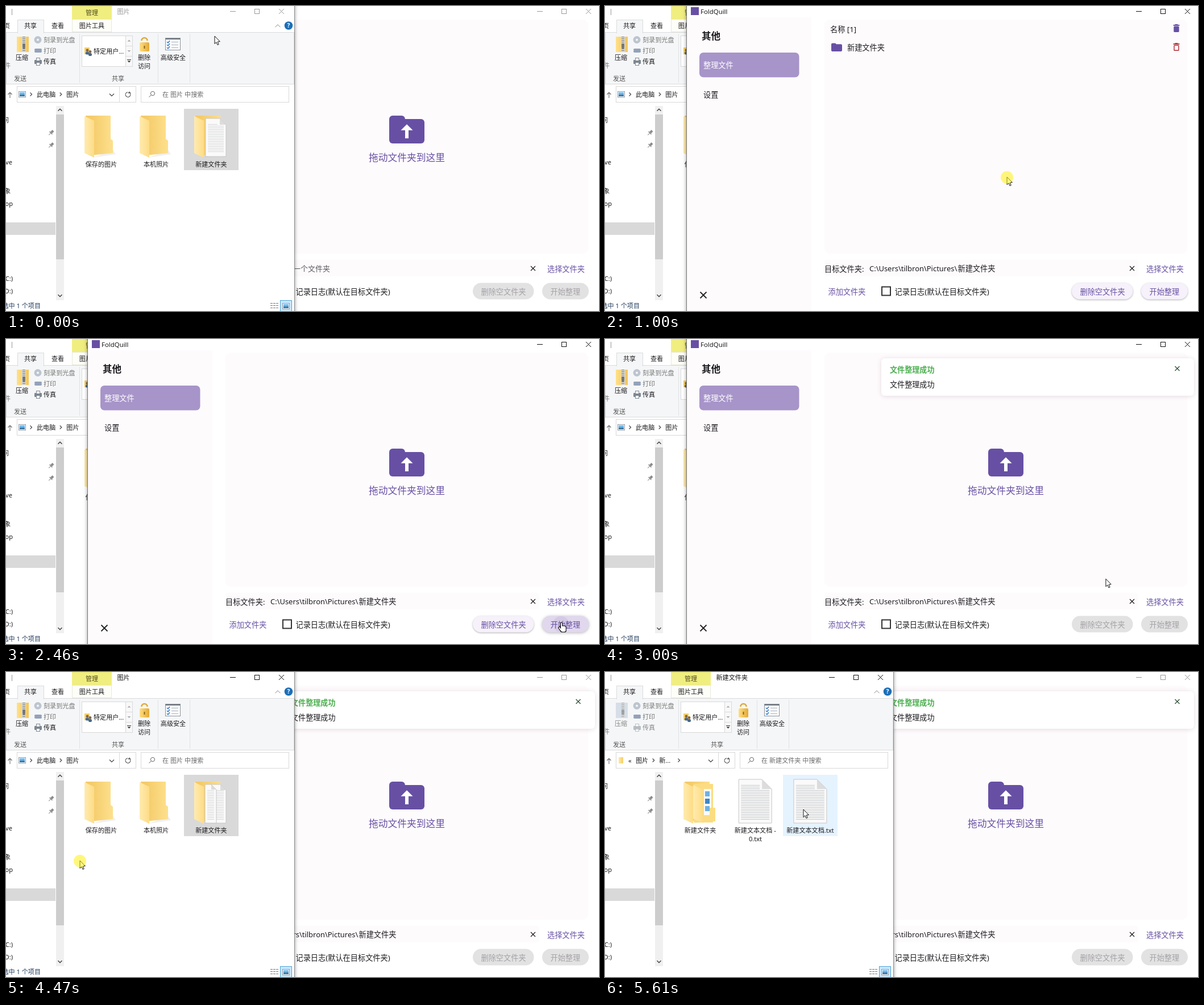
Write an HTML page with a canvas that moves like this. It is 1043 px wide and 537 px high and loops after 6.01 s.

```html
<!DOCTYPE html>
<html lang="zh">
<head>
<meta charset="utf-8">
<style>
html, body { margin: 0; width: 100%; height: 100%; overflow: hidden; background: #fff; }
canvas { display: block; }
</style>
</head>
<body>
<canvas id="stage" width="1043" height="537"></canvas>
<script>
const g = document.getElementById('stage').getContext('2d');
const LOOP = 6010, TICK = 66.7;
const PURPLE = '#6750a4', INK = '#1c1b1f', TINT = '#fefbfd', GREY = '#777', EDGE = '#d9d9d9';
const FONT = '"Noto Sans", "Noto Sans CJK SC", "Noto Sans CJK", sans-serif';
const { PI } = Math;

// Where the pointer goes, and between which ticks it travels there
const START = { x: 367, y: 53 };
const MOVES = [
  { from: 0, to: 4, x: 358, y: 238 },      // folder
  { from: 5, to: 10, x: 688, y: 230 },     // drop zone
  { from: 10, to: 13, x: 707, y: 301 },
  { from: 18, to: 24, x: 956, y: 475 },    // start button
  { from: 24, to: 31, x: 977, y: 499 },
  { from: 37, to: 42, x: 886, y: 426 },
  { from: 44, to: 51, x: 794, y: 360 },
  { from: 52.7, to: 64, x: 130, y: 332 },  // back to the browser
  { from: 67, to: 75, x: 349, y: 242 }     // folder again
];

const clamp = v => Math.min(1, Math.max(0, v));
const smooth = f => f * f * (3 - 2 * f);
const within = (k, a, b) => k >= a && k < b;

function pointer(k) {
  return MOVES.reduce((p, m) => {
    const f = smooth(clamp((k - m.from) / (m.to - m.from)));
    return { x: p.x + (m.x - p.x) * f, y: p.y + (m.y - p.y) * f };
  }, START);
}

/* Drawing helpers */
function rect(x, y, w, h, fill, stroke) {
  if (fill) { g.fillStyle = fill; g.fillRect(x, y, w, h); }
  if (stroke) { g.strokeStyle = stroke; g.lineWidth = 1; g.strokeRect(x + .5, y + .5, w - 1, h - 1); }
}
function round(x, y, w, h, r, fill) {
  g.beginPath(); g.roundRect(x, y, w, h, r); g.fillStyle = fill; g.fill();
}
function disc(x, y, r, fill) {
  g.beginPath(); g.arc(x, y, r, 0, 2 * PI); g.fillStyle = fill; g.fill();
}
function ring(x, y, r, color, w = 1, a = 0, b = 2 * PI) {
  g.beginPath(); g.arc(x, y, r, a, b); g.strokeStyle = color; g.lineWidth = w; g.stroke();
}
function trace(pts) {
  g.beginPath();
  for (let i = 0; i < pts.length; i += 2) g.lineTo(pts[i], pts[i + 1]);
}
function poly(fill, ...pts) { trace(pts); g.fillStyle = fill; g.fill(); }
function line(color, w, ...pts) { trace(pts); g.strokeStyle = color; g.lineWidth = w; g.stroke(); }
const hline = (x, y, w, color, t = 1) => rect(x, y, w, t, color);
const vline = (x, y, h, color, t = 1) => rect(x, y, t, h, color);

function at(x, y, draw, turn = 0) {
  g.save(); g.translate(x, y); g.rotate(turn); draw(); g.restore();
}
function faded(a, draw) { g.save(); g.globalAlpha *= a; draw(); g.restore(); }
function shadowed(blur, color, draw) {
  g.save();
  g.shadowBlur = blur; g.shadowColor = color; g.shadowOffsetY = 1;
  draw();
  g.restore();
}
function ramp(x0, x1, a, b) {
  const r = g.createLinearGradient(x0, 0, x1, 0);
  r.addColorStop(0, a); r.addColorStop(1, b);
  return r;
}

const RIGHT = 0, DOWN = PI / 2, UP = -PI / 2;
const chevron = (x, y, r, turn, color = '#444', w = 1.2) =>
  at(x, y, () => line(color, w, -r / 2, -r, r / 2, 0, -r / 2, r), turn);
const triangle = (x, y, r, turn, color) =>
  at(x, y, () => poly(color, -r / 2, -r, r / 2, 0, -r / 2, r), turn);
function cross(x, y, r, color, w = 1.2) {
  for (const s of [-1, 1]) line(color, w, x - r, y - r * s, x + r, y + r * s);
}

function text(s, x, cy, color = INK, size = 11.1, align = 'left', weight = 400) {
  g.font = `${weight} ${size}px ${FONT}`;
  g.textAlign = align;
  g.fillStyle = color;
  g.fillText(s, x, cy + size * .37);
  return g.measureText(s).width;
}
const centred = (s, x, cy, color) => text(s, x, cy, color, 11.1, 'center');
const ending = (s, x, cy, color) => text(s, x, cy, color, 11.1, 'right');
const label = (s, x, cy, color = INK) => text(s, x, cy, color, 13.2, 'left', 350);

function windowFrame(x, w) {
  shadowed(7, 'rgba(0,0,0,.5)', () => rect(x, -20, w, 580, '#fff'));
}
function windowButtons(x, active) {
  const color = active ? '#111' : '#999';
  hline(x - 5, 9, 10, color);
  rect(x + 38, 5, 9, 9, null, color);
  cross(x + 85.5, 9.5, 4.5, color, 1);
}

/* File icons */
function page(x, y, w, h, fold, ink = '#c3c5c7') {
  at(x, y, () => {
    const outline = [0, 0, w - fold, 0, w, fold, w, h, 0, h, 0, 0];
    poly('#fafafa', ...outline);
    for (let i = 10; i < h - 6; i += 3) hline(4, i, (i < fold ? w - fold : w) - 8, ink);
    line('#c6c6c6', 1, ...outline);
    poly('#dcdcdc', w - fold, 0, w, fold, w - fold, fold);
  });
}
function flap(x, y, h) {
  at(x, y, () => poly(ramp(0, 17, '#ffebb0', '#fddc86'), 0, 0, 17, 8, 17, h, 0, h - 8));
}
function folder(x, y, content) {
  at(x, y, () => {
    poly('rgba(0,0,0,.06)', 16, 74, 55, 68, 50, 60);
    poly(ramp(12, 48, '#f4cb6a', '#fddf8b'), 2, 0, 46, 0, 46, 41, 50, 44, 50, 66, 10, 70);
    if (content) content();
    flap(0, 1, 73);
  });
}
const onePage = () => page(20, 5, 36, 67, 11, '#d6d7d8');
const twoPages = () => {
  page(28, 5, 28, 68, 10, '#d6d7d8');
  page(19, 5, 20, 68, 9, '#d6d7d8');
};
const subfolder = () => {
  rect(18, 4, 34, 68, '#fbdc82');
  rect(36, 13, 13, 46, '#fafafa');
  for (let i = 0; i < 3; i++) rect(38, 17 + 13 * i, 8, 9, i % 2 ? '#3d87c4' : '#6fb1e0');
  rect(46, 46, 10, 24, '#fbdc82');
  flap(17, 6, 67);
};
function picture(x, y) {
  rect(x, y, 13, 11, '#fff', '#8d9aa6');
  rect(x + 2, y + 2, 9, 4, '#6db9ee');
  rect(x + 2, y + 6, 9, 3, '#3f759f');
}

/* File browser window */
function tabs() {
  rect(0, 46, 507, 92, '#f5f6f7', '#dadbdc');
  rect(20, 24, 47, 24, '#f5f6f7', '#dadbdc');
  rect(21, 45, 45, 4, '#f5f6f7');
  rect(116, 0, 70, 23, '#f1ee80');
  rect(116, 23, 70, 23, '#fefef8', '#e8e8dc');
  vline(10, 5, 11, '#999');
  centred('管理', 151, 12, '#4c4a1c');
  ending('页', 7, 35);
  centred('共享', 43, 35);
  centred('查看', 91, 35);
  centred('图片工具', 151, 35);
  chevron(478, 35, 4.5, UP, '#888', 1);
  disc(497, 34.5, 7.3, '#1b6fb8');
  text('?', 497, 34.5, '#fff', 10.5, 'center', 700);
}
function sendGroup(idle) {
  const ink = idle ? '#888' : INK;
  faded(idle ? .5 : 1, () => {
    rect(19, 54, 21, 27, idle ? '#b6c8dc' : ramp(19, 40, '#ffe08a', '#f2c558'));
    rect(28, 54, 7, 27, '#d9d9d4');
    for (let y = 54; y < 80; y += 3) hline(29, y, 5, '#777');
    round(29, 66, 5, 9, 2, '#777');
    round(50, 95, 13, 7, 1, '#7e8790');
    for (const y of [91, 99]) rect(53, y, 7, 6, '#fff', '#7e8790');
  });
  disc(56, 59.5, 6.5, '#bcc5cf');
  disc(56, 59.5, 2, '#f5f6f7');
  for (const y of [77, 80]) round(50, y - 2, 13, 4, 2, '#93a2ba');
  centred('压缩', 28, 91, ink);
  ending('件', 8, 105, GREY);
  ['刻录到光盘', '打印', '传真'].forEach((s, i) => text(s, 66, 60 + 19 * i, i < 2 ? GREY : ink));
  centred('发送', 25, 128, '#555');
}
function shareGroup() {
  rect(133, 52, 90, 55, '#fff', '#d8d9da');
  for (let i = 0; i < 3; i++) {
    rect(210, 52 + 18 * i, 13, 19, '#f8f8f9', '#d8d9da');
    triangle(216.5, 61 + 18.5 * i, 3, i ? DOWN : UP, i < 2 ? '#aaa' : '#333');
  }
  hline(213, 94, 7, '#333');
  rect(138, 73, 9, 12, '#f5cf68');
  for (const x of [143, 148]) {
    disc(x, x / 2 + 6.5, 2.4, '#80654c');
    round(x - 3, x / 2 + 9, 6, 5, 2, '#466888');
  }
  text('特定用户...', 154, 80);
  ring(243.5, 61, 5, '#e0a93a', 2.6, PI, 0);
  round(235, 64, 17, 16, 2, ramp(235, 252, '#ffdf83', '#e4a934'));
  rect(242.5, 70, 2, 5, '#8d671c');
  ['删除', '访问'].forEach((s, i) => centred(s, 243, 91 + 15 * i));
  centred('共享', 197, 128, '#555');
  rect(280, 56, 27, 22, '#fff', '#8b929a');
  hline(281, 57, 25, '#6f7780', 2);
  for (let y = 63; y < 78; y += 5) {
    line('#2f74c4', 1.4, 283, y, 285, y + 2, 288, y - 2);
    hline(291, y, 12, '#a3abb5');
  }
  centred('高级安全', 294, 91);
  for (const x of [129, 267, 323]) vline(x, 49, 86, '#e1e2e3');
}
function addressBar(s) {
  vline(6.5, 153, 9, '#666');
  chevron(7, 154, 3.5, UP, '#666');
  rect(19, 141, 210, 29, '#fff', EDGE);
  vline(199, 141, 29, EDGE);
  if (s.inside) rect(24, 150, 8, 11, ramp(24, 32, '#ffe9a6', '#f5cf68'));
  else picture(22, 150);
  if (s.inside) text('«', 41, 156); else chevron(44, 155.5, 3, RIGHT);
  let x = 54;
  s.crumbs.forEach((name, i) => {
    x += text(name, x, 156) + 9;
    if (s.inside || s.short || i == 0) chevron(x, 155.5, 3, RIGHT);
    x += 10;
  });
  chevron(186, 156.5, 4, DOWN);
  ring(214.5, 156, 4.3, '#555', 1.2, -.6, 4.6);
  triangle(217, 152, 3, UP, '#555');
  rect(237, 141, 261, 29, '#fff', EDGE);
  ring(258, 154, 3.6, '#666');
  line('#666', 1, 255.3, 156.7, 251.5, 160.5);
  text(`在 ${s.inside ? '新建文件夹' : '图片'} 中搜索`, 275, 156, '#6a6a6a');
}
function sidePane() {
  rect(0, 381, 87, 22, EDGE);
  ending('问', 5, 201);
  ending('ve', 11, 275);
  ['象', 'top', , , , , , '(C:)', '(D:)'].forEach((s, i) => ending(s, s.length > 1 ? 12 : 8, 326 + 22 * i));
  for (const y of [223, 245]) at(79.5, y, () => {
    rect(-2, -5, 4, 5, '#8b8b8b'); hline(-3.5, 0, 7, '#8b8b8b', 1.5); vline(-.5, 1, 5, '#8b8b8b');
  }, PI / 4);
  rect(88, 176, 14, 342, '#f0f0f0');
  rect(88, 191, 14, 255, '#cdcdcd');
  chevron(95, 183, 3.5, UP, '#444', 1.5);
  chevron(95, 510, 3.5, DOWN, '#444', 1.5);
}
function files(s) {
  if (s.tile) rect(313, 181, 96, 108, s.tile);
  const names = s.inside ? ['新建文件夹', '新建文本文档 -', '新建文本文档.txt'] : ['保存的图片', '本机照片', '新建文件夹'];
  names.forEach((name, i) => {
    const x = 138 + 96.7 * i;
    if (s.inside && i) page(x + .5, 189, 58, 77, 17);
    else folder(Math.round(x), 193, s.inside ? subfolder : i == 2 && s.content);
    centred(name, x + 29.5, 279);
  });
  if (s.inside) centred('0.txt', 264.5, 294);
}
function statusBar(selected) {
  if (selected) ending('选中 1 个项目', 61, 528, '#1e395b');
  for (let y = 523; y < 533; y += 4)
    for (let x = 465; x < 479; x += 5) hline(x, y, 4, GREY);
  rect(482, 518, 21, 20, '#cce8ff', '#4ba3d8');
  picture(486, 523);
}
function browser(s) {
  windowFrame(-20, 527);
  vline(507, 0, 537, '#8c8c8c');
  text(s.inside ? '新建文件夹' : '图片', 195.5, 10, s.active ? '#111' : '#999');
  windowButtons(399, s.active);
  tabs();
  sendGroup(s.idle);
  shareGroup();
  addressBar(s);
  sidePane();
  if (!s.loading) files(s);
  statusBar(s.selected);
}

/* Organiser app window */
function pill(x, w, title, on, fill = '#f6f1fa', lift = 3) {
  const draw = () => round(x, 487.5, w, 29, 14.5, on ? fill : '#e3e2e3');
  on ? shadowed(lift, 'rgba(0,0,0,.3)', draw) : draw();
  label(title, x + 14.5, 503, on ? PURPLE : '#a3a1a4');
}
function bin(x, y, color, solid) {
  hline(x - 5.5, y - 6, 11, color, 1.8);
  hline(x - 2.5, y - 7, 5, color, 1.5);
  round(x - 4.7, y - 3.5, 9.4, 10.5, 1.5, color);
  if (!solid) rect(x - 3.2, y - 2, 6.4, 7.4, TINT);
}
function folderMark(x, y, w, h, r) {
  round(x, y, w * .45, h / 2, r, PURPLE);
  round(x, y + h * .12, w, h * .88, r, PURPLE);
}
function dropZone() {
  folderMark(674, 193, 62, 49, 6);
  triangle(705, 213.5, 10.5, UP, '#fff');
  rect(702, 216, 6, 17, '#fff');
  text('拖动文件夹到这里', 638, 267, PURPLE, 16.75, 'left', 350);
}
function fileList() {
  label('名称 [1]', 396, 41);
  bin(1005, 39, PURPLE, true);
  folderMark(398, 65.5, 19, 14.5, 2);
  label('新建文件夹', 426, 73);
  bin(1005, 72, '#b3363c');
}
function toast(p) {
  faded(p, () => at(0, (p - 1) * 24, () => {
    shadowed(8, 'rgba(90,40,60,.16)', () => round(486, 34, 550, 66, 6, '#fff'));
    text('文件整理成功', 501, 54, '#4caf50', 13.1, 'left', 700);
    text('文件整理成功', 501, 80, INK, 13.1, 'left', 350);
    cross(1006.5, 52, 4, '#2d5038', 1.3);
  }));
}
function sideMenu() {
  rect(144, 20, 219, 517, TINT);
  text('其他', 170, 53, INK, 16.6, 'left', 700);
  round(166, 82, 175.5, 43.5, 7, '#a794c9');
  label('整理文件', 173, 104, '#fff');
  label('设置', 173, 156);
  cross(173, 509, 5.5, '#222', 1.8);
}
function targetRow(s) {
  round(386, 447, 552, 29, 5, TINT);
  label('目标文件夹:', 386, 463);
  if (s.chosen) {
    text('C:\\Users\\tilbron\\Pictures\\', 465, 462, INK, 12.95, 'left', 350);
    label('新建文件夹', 620.5, 462);
  } else text('请选择一个文件夹', 570, 462, '#5c5a60', 13, 'right', 350);
  cross(927, 462, 4, '#222', 1.3);
  if (s.overPick) round(946, 447, 78, 29, 14.5, '#f5f0f9');
  label('选择文件夹', 952, 463, PURPLE);
}
function actionRow(s) {
  label('添加文件夹', 392.5, 503, PURPLE);
  rect(486, 493.5, 17, 17, '#333');
  rect(488, 495.5, 13, 13, '#fff');
  label('记录日志(默认在目标文件夹)', 509.5, 503);
  pill(821, 107.5, '删除空文件夹', s.enabled);
  const fill = s.pressed ? '#e1d8ed' : s.overStart ? '#efe8f6' : undefined;
  pill(943, 82, '开始整理', s.enabled, fill, s.overStart ? 5 : 3);
  if (s.pressed) disc(976, 502, 14, 'rgba(103,80,164,.1)');
}
function app(s) {
  windowFrame(144, 930);
  vline(143, 0, 537, GREY);
  rect(151, 2, 14, 14, PURPLE);
  text('FoldQuill', 168, 9.5, INK, 11.4);
  windowButtons(939, s.active);
  sideMenu();
  round(386, 24, 638, 412, 9, TINT);
  s.listed ? fileList() : dropZone();
  targetRow(s);
  actionRow(s);
  toast(s.toast);
}

/* Pointer */
function arrow() {
  const shape = [0, 0, 0, 13.5, 3, 10.8, 5, 15.5, 7.2, 14.6, 5.2, 10, 9.3, 9.6, 0, 0];
  poly('#fff', ...shape);
  line('#111', 1, ...shape);
}
function hand() {
  for (const [grow, color] of [[.6, '#111'], [-.5, '#fff']]) {
    const part = (x, y, w, h, r) => round(x - grow, y - grow, w + 2 * grow, h + 2 * grow, r, color);
    part(-1.5, 0, 3, 12, 1.5);
    part(-1.5, 6, 9.5, 11, 3);
    at(-4, 9, () => part(-1.5, -1, 3, 8, 1.5), -.6);
  }
}

function draw(k) {
  const { x, y } = pointer(k);
  const appFront = within(k, 15, 67);
  const inside = k >= 78;
  const selected = k < 68 || within(k, 75, 78);
  const over = x > 313 && x < 409 && y > 181 && y < 289;
  const tile = selected ? (over ? '#cce8ff' : EDGE) : over && '#e5f3ff';
  const short = within(k, 55, 67);
  const overStart = within(k, 26, 39);

  const drawBrowser = () => browser({
    active: k >= 67, inside, selected, tile, short,
    idle: !selected,
    loading: k == 78,
    content: k < 38 ? onePage : twoPages,
    crumbs: inside ? ['图片', '新...  '].slice(0, k < 84 ? 1 : 2) : [short ? '此...  ' : '此电脑', '图片']
  });
  const drawApp = () => app({
    active: appFront,
    listed: within(k, 12, 37),
    chosen: k >= 12,
    enabled: within(k, 12, 39),
    overPick: x > 946 && x < 1024 && y > 447 && y < 477,
    overStart,
    pressed: within(k, 35, 39),
    toast: clamp((k - 38) / 3)
  });

  rect(0, 0, 1043, 537, '#fff');
  const layers = [drawApp, drawBrowser];
  if (appFront) layers.reverse();
  layers.forEach(layer => layer());

  at(x, y, within(k, 24, 39) ? hand : arrow);
  const dragging = within(k, 6, 11);
  const clicking = [15, 35, 67, 75, 77].includes(k);
  if (dragging || clicking) disc(x, y + .7, 11, 'rgba(255,240,10,.53)');
}

function loop(now) {
  draw(Math.floor((now % LOOP + 8) / TICK));
  requestAnimationFrame(loop);
}
requestAnimationFrame(loop);
</script>
</body>
</html>
```
